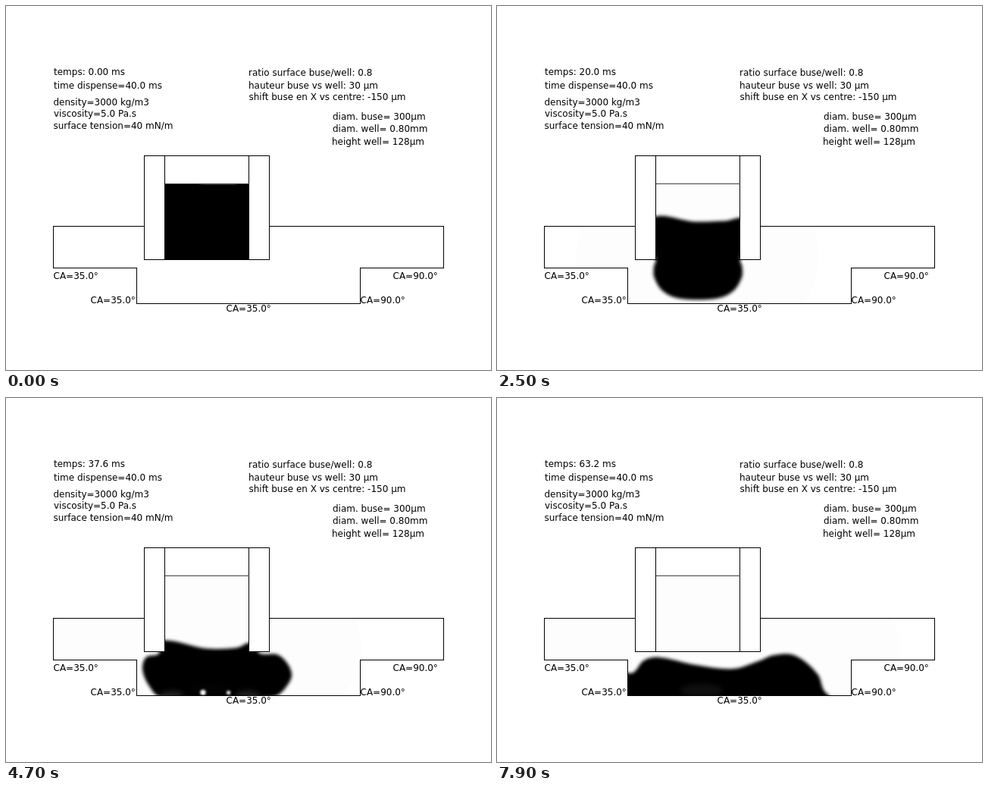
Animation, 640 px wide and 480 px high, one loop 8 s. Source, as an HTML page with a canvas:

```html
<!DOCTYPE html>
<html lang="fr">
<head>
<meta charset="utf-8">
<title>Dispense</title>
<style>
  html, body { margin: 0; width: 100%; height: 100%; overflow: hidden; background: #fff; }
  canvas, svg { position: absolute; left: 0; top: 0; display: block; }
  text { font: 12px "DejaVu Sans", sans-serif; fill: #000; white-space: pre; }
  path { fill: none; stroke: #000; shape-rendering: crispEdges; }
</style>
</head>
<body>
<canvas id="fluid" width="640" height="480"></canvas>
<svg width="640" height="480" viewBox="0 0 640 480">
  <path d="M182.5 290.5H62.5V345.5H172.5V392.5H467.5V345.5H577.5V290.5H347.5"/>
  <path d="M182.5 197.5H347.5V334.5H182.5ZM209.5 197.5V334.5M320.5 197.5V334.5"/>
  <path d="M209.5 234H320.5" style="stroke:#444"/>
  <text id="clock" x="63" y="91">temps: 0.00 ms</text>
  <text x="63" y="109">time dispense=40.0 ms</text>
  <text x="62.5" y="131">density=3000 kg/m3</text>
  <text x="63" y="146">viscosity=5.0 Pa.s</text>
  <text x="62.5" y="162">surface tension=40 mN/m</text>
  <text x="320" y="92">ratio surface buse/well: 0.8</text>
  <text x="320" y="109">hauteur buse vs well: 30 µm</text>
  <text x="320.5" y="124">shift buse en X vs centre: -150 µm</text>
  <text x="431" y="150">diam. buse= 300µm</text>
  <text x="431" y="166">diam. well= 0.80mm</text>
  <text x="430" y="183">height well= 128µm</text>
  <text x="62.5" y="360">CA=35.0°</text>
  <text x="111.5" y="392">CA=35.0°</text>
  <text x="290.5" y="403">CA=35.0°</text>
  <text x="467.5" y="392">CA=90.0°</text>
  <text x="510.5" y="360">CA=90.0°</text>
</svg>
<script>
const LOOP = 8000, STEP = 100, MS_PER_STEP = 0.8, FLOOR = 397;
const ctx = document.getElementById('fluid').getContext('2d');
const clock = document.getElementById('clock');

// Inside of the nozzle, the band beside it and the well
const domain = new Path2D('M62 290H182V334H210V234H320V334H347V290H577V345H467V392H173V345H62Z');

const mix = (a, b, k) => Array.isArray(a) ? a.map((v, i) => mix(v, b[i], k)) : a + (b - a) * k;

function sample(keys, t) {
  if (t <= keys[0][0]) return keys[0][1];
  const i = keys.findIndex(key => key[0] >= t);
  if (i < 0) return keys[keys.length - 1][1];
  const [t0, a] = keys[i - 1], [t1, b] = keys[i];
  return mix(a, b, (t - t0) / (t1 - t0));
}

// Half profiles below the nozzle: half width, share of the depth
const round = [[55, .03], [55, .18], [53, .44], [41, .78], [20, .96]];
const flat = [[60, .05], [79, .16], [88, .5], [78, .86], [52, 1]];

// Liquid column with a symmetric drop; outlines run clockwise from the top left
function drop(level, sag, depth, spread, cx) {
  const half = mix(round, flat, spread).map(([x, k]) => [x, 334 + k * depth]);
  const side = sign => half.map(([x, y]) => [cx + sign * x, y]);
  return [[200, level], [cx - 2, level + sag], [300, level + sag * .4], [330, level],
    ...side(1), ...side(-1).reverse()];
}

const outlines = [
  [0, drop(236, 0, 0, 0, 265)],
  [1900, drop(271, 1, 46, 0, 265)],
  [2300, drop(279, 1, 53, .03, 265)],
  [3100, drop(294, 4, 55, .45, 266)],
  [4100, drop(310, 10, 58, 1, 270)],
  [5400, [[210, 331], [258, 342], [310, 347], [319, 337], [340, 336], [374, 335], [399, 363],
    [391, 383], [386, FLOOR], [188, FLOOR], [186, 376], [178, 352], [178, 340], [192, 337]]],
  [6300, [[205, 337], [260, 350], [318, 358], [342, 352], [362, 338], [390, 333], [420, 363],
    [416, 384], [417, FLOOR], [174, FLOOR], [184, 380], [181, 357], [183, 342], [193, 336]]],
  [7900, [[214, 342], [262, 352], [312, 357], [345, 347], [366, 339], [394, 340], [423, 364],
    [431, 385], [440, FLOOR], [160, FLOOR], [160, 385], [166, 364], [180, 362], [194, 346]]]
];

// Air trapped at the floor: x, radius
const bubbles = [
  [[3600, [260, 0]], [5400, [260, 6]], [6300, [263, 5]], [7600, [265, 0]]],
  [[3600, [290, 0]], [5400, [296, 4.2]], [6200, [303, 0]]]
];

// Closed smooth curve whose handles scale with each segment
function smooth(points) {
  const n = points.length, at = i => points[(i + n) % n];
  const heading = i => {
    const [ax, ay] = at(i - 1), [bx, by] = at(i + 1);
    const len = Math.hypot(bx - ax, by - ay) || 1;
    return [(bx - ax) / len, (by - ay) / len];
  };
  const path = new Path2D();
  path.moveTo(...points[0]);
  for (let i = 0; i < n; i++) {
    const [px, py] = at(i), [qx, qy] = at(i + 1);
    const [ux, uy] = heading(i), [vx, vy] = heading(i + 1);
    const h = Math.hypot(qx - px, qy - py) / 3;
    path.bezierCurveTo(px + ux * h, py + uy * h, qx - vx * h, qy - vy * h, qx, qy);
  }
  path.closePath();
  return path;
}

function blob(x, y, rx, ry, alpha, color) {
  if (alpha <= 0 || rx <= 0) return;
  ctx.globalAlpha = alpha;
  ctx.fillStyle = color;
  ctx.beginPath();
  ctx.ellipse(x, y, rx, ry, 0, 0, Math.PI * 2);
  ctx.fill();
  ctx.globalAlpha = 1;
}

const blur = r => { ctx.filter = r > 0 ? `blur(${r}px)` : 'none'; };

function draw(t) {
  ctx.clearRect(0, 0, 640, 480);
  ctx.save();
  ctx.clip(domain);
  if (t > 0) blob(265, 330, 110 + t * .02, 130, 1, '#fdfdfd');
  else {
    ctx.fillStyle = '#333';
    ctx.fillRect(210, 234, 110, 3);
  }

  const liquid = smooth(sample(outlines, t));
  // Keeps the column full right up to the nozzle walls
  const top = 242 + t * .0195;
  if (top < 328) liquid.rect(195, top, 140, 328 - top);
  blur(Math.min(2, t / 250));
  ctx.fillStyle = '#000';
  ctx.fill(liquid);

  // Lighter contact zones on the floor
  blur(3);
  const contact = .3 * (1 - Math.abs(t - 4100) / 1000);
  for (const x of [219, 319]) blob(x, 392, 16, 6, contact, '#fff');
  blob(270, 386, 28, 9, Math.min(.06, (t - 4600) / 10000), '#fff');

  blur(1.5);
  for (const keys of bubbles) {
    const [x, r] = sample(keys, t);
    blob(x, 388.5, r, r, 1, '#fff');
  }
  ctx.restore();
}

let shown = -1;
function tick(now) {
  const step = Math.floor(now % LOOP / STEP);
  if (step !== shown) {
    shown = step;
    const ms = step * MS_PER_STEP;
    clock.textContent = `temps: ${ms.toFixed(ms < 10 ? 2 : 1)} ms`;
    draw(step * STEP);
  }
  requestAnimationFrame(() => tick(performance.now() - start));
}
const start = performance.now();
tick(0);
</script>
</body>
</html>
```
